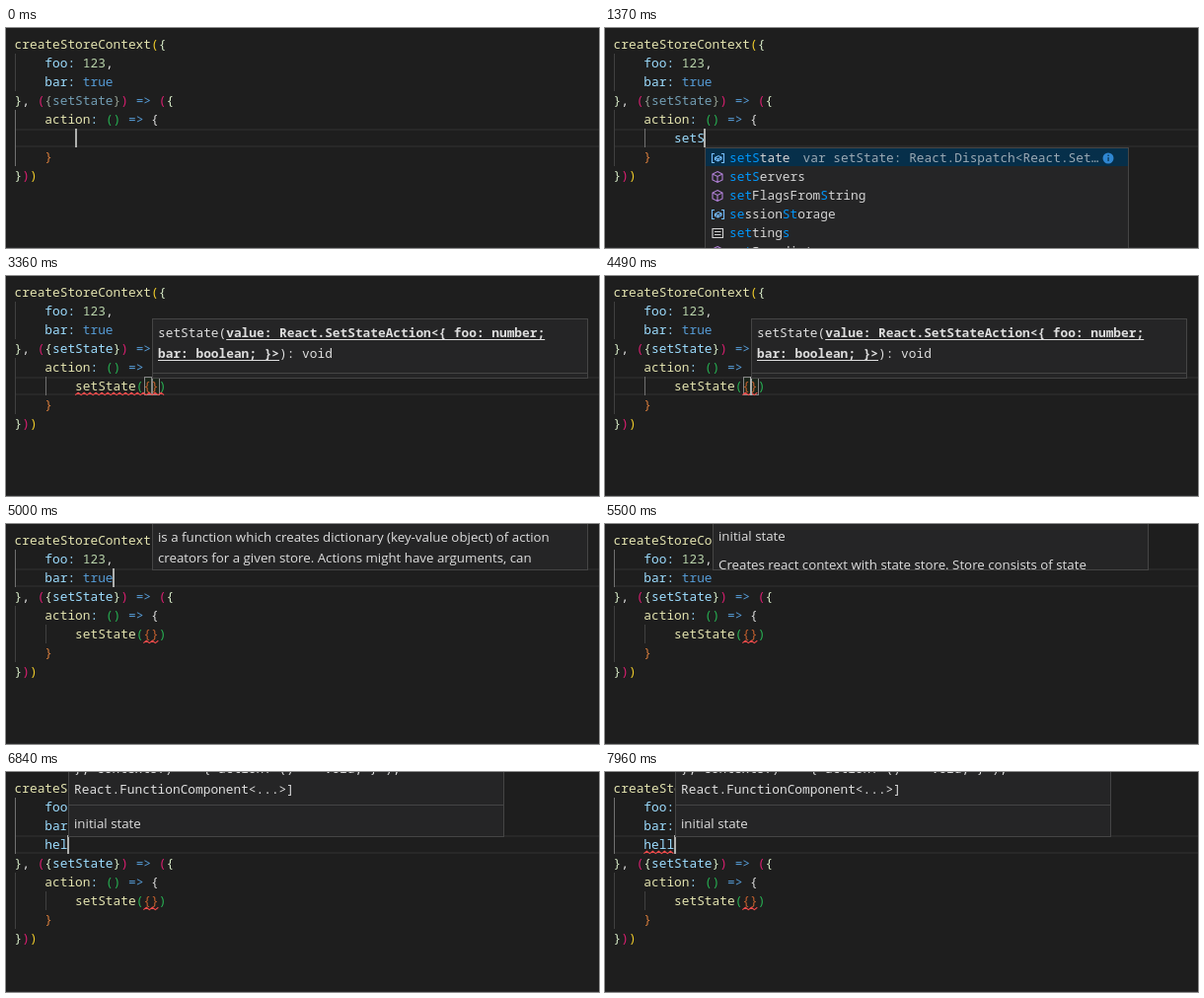
An HTML page with a canvas for the animation above (8000 ms loop, 601x223 px).

```html
<!DOCTYPE html>
<html lang="en">
<head>
<meta charset="utf-8">
<title>Editor typing</title>
<style>
  html, body { margin: 0; width: 100%; height: 100%; overflow: hidden; background: #1e1e1e; }
  canvas { display: block; }
</style>
</head>
<body>
<canvas id="stage" width="601" height="223"></canvas>
<script>
const ctx = document.getElementById('stage').getContext('2d');
const LOOP = 8000, CHAR = 7.69, LINE = 19;
const MONO = '12.82px "Noto Sans Mono", monospace';
const SANS = '13.3px "Open Sans", sans-serif';
const COLORS = {
  y: '#e4e4b0', b: '#9cdcfe', n: '#b9d4ab', k: '#569cd6', w: '#dcdcdc',
  g: '#f0cc2a', p: '#da1f70', e: '#27b052', m: '#d8ecc8', o: '#d67c3c', r: '#c4602e',
  f: '#729db3', d: '#949f92'
};
const colX = col => 8.6 + col * CHAR;
const rowY = row => 7 + row * LINE;

// Each step changes part of the editor state from its time on.
const steps = [
  [0, { body: '', extra: null, comma: '', row: 5, col: 8, on: 1, used: 0, list: null, tip: null,
        wave: null, extraWave: 0, match: [], guide: [0, 4, 6] }],
  [380, { on: 0 }],
  [530, { body: 's', col: 9, on: 1, guide: [4, 5, 5] }],
  [740, { body: 'se', col: 10 }],
  [890, { body: 'set', col: 11 }],
  [1210, { body: 'setS', col: 12 }],
  [1370, { list: 'all' }],
  [1420, { body: 'setSt', col: 13, list: 'few' }],
  [1500, { body: 'setSta', col: 14 }],
  [1580, { body: 'setStat', col: 15 }],
  [1670, { body: 'setState', col: 16 }],
  [2130, { body: 'setState()', col: 17, list: null, match: [[5, 16], [5, 17]] }],
  [2320, { used: 1 }],
  [2470, { tip: 'call', tipCol: 17, tipRow: 5 }],
  [2620, { on: 0 }],
  [2820, { wave: [8, 18] }],
  [2870, { body: 'setState({})', col: 18, on: 1, wave: [8, 20], match: [[5, 17], [5, 18]] }],
  [2950, { tipCol: 18 }],
  [3360, { on: 0 }],
  [3460, { wave: [17, 19], list: 'props', pick: 0 }],
  [3880, { on: 1 }],
  [4040, { pick: 1 }],
  [4330, { list: null, on: 0 }],
  [4490, { on: 1 }],
  [4610, { row: 4, match: [[4, 18], [6, 4]] }],
  [4720, { row: 3, match: [], tip: null, guide: [0, 4, 6] }],
  [4860, { row: 2, col: 13, guide: [0, 1, 2] }],
  [4940, { tip: 'args', tipRow: 2 }],
  [5160, { tip: 'init', tipCol: 13, shift: 0 }],
  [5500, { on: 0 }],
  [5800, { comma: ',', col: 14, on: 1 }],
  [5840, { tipCol: 14 }],
  [6000, { extra: '', row: 3, col: 4, guide: [0, 1, 3] }],
  [6070, { tipCol: 4, tipRow: 3 }],
  [6380, { extra: 'h', col: 5, tipCol: 5, shift: 21 }],
  [6510, { extra: 'he', col: 6, tipCol: 6 }],
  [6650, { extra: 'hel', col: 7 }],
  [6750, { tipCol: 7 }],
  [7120, { on: 0 }],
  [7250, { extraWave: 1 }],
  [7580, { on: 1 }],
  [7890, { extra: 'hell', col: 8 }],
  [7930, { tipCol: 8 }]
];

// Parts between * are highlighted as matching.
const lists = {
  all: [
    ['var', '*setS*tate', 'var setState: React.Dispatch<React.Set…'],
    ['cube', '*setS*ervers'],
    ['cube', '*set*FlagsFrom*S*tring'],
    ['var', '*se*ssion*St*orage'],
    ['word', '*set*ting*s*'],
    ['cube', '*set*Immediate']
  ],
  props: [
    ['field', 'bar', '(property) bar: boolean'],
    ['field', 'foo', '(property) foo: number']
  ]
};
lists.few = [['var', '*setSt*ate', lists.all[0][2]], ...[2, 3, 4].map(i => lists.all[i])];

const cubePath = 'M6 .5L11 3v6L6 11.5 1 9V3zM1 3l5 2.5L11 3M6 5.5v6';
const icons = {
  cube: ['#b180d7', cubePath],
  field: ['#75beff', cubePath],
  var: ['#75beff', 'M3 1.5H.5v9H3M10 1.5h2.5v9H10M3.5 5.5L7 3.5l3 1.5v2L6.5 9l-3-1.5zM3.5 5.5l3 1.5L10 5M6.5 7v2'],
  word: ['#d4d4d4', 'M1 1.5h10.5v9H1zM3 4.5h6.5M3 7.5h6.5']
};

function rect(x, y, w, h, color) {
  ctx.fillStyle = color;
  ctx.fillRect(x, y, w, h);
}

function text(str, x, y, color, font = MONO) {
  ctx.font = font;
  ctx.fillStyle = color;
  ctx.fillText(str, x, y);
}

// Tokens are separated by | and start with their colour key.
function tokens(source, row) {
  let col = 0;
  for (const token of source.split('|')) {
    text(token.slice(1), colX(col), rowY(row) + 14, COLORS[token[0]]);
    col += token.length - 1;
  }
}

function panel(x, y, w, h) {
  rect(x, y, w, h, '#454545');
  rect(x + 1, y + 1, w - 2, h - 2, '#252526');
}

function wave(row, from, to) {
  const bottom = rowY(row) + LINE, end = colX(to);
  ctx.beginPath();
  for (let x = colX(from), i = 0; x <= end; x += 3, i++) ctx.lineTo(x, bottom - (i % 2 ? 2.8 : 0.4));
  ctx.strokeStyle = '#f14c4c';
  ctx.lineWidth = 1.1;
  ctx.stroke();
}

function drawGuides(s, shift) {
  const guide = (col, from, to, color) =>
    rect(Math.ceil(colX(col)), rowY(from), 1, (to - from + 1) * LINE, color);
  guide(0, 1, 2 + shift, '#404040');
  guide(0, 4 + shift, 6 + shift, '#404040');
  if (s.body) guide(4, 5 + shift, 5 + shift, '#404040');
  guide(...s.guide, '#707070');
}

function drawCode(s) {
  const shift = s.extra === null ? 0 : 1;
  rect(9, rowY(s.row), 592, LINE, '#282828');
  rect(9, rowY(s.row) + 2, 592, LINE - 4, '#1e1e1e');
  drawGuides(s, shift);

  for (const [row, col] of s.match) {
    const x = Math.ceil(colX(col));
    rect(x, rowY(row), 8, LINE, 'rgba(0,100,0,.1)');
    ctx.strokeStyle = '#888';
    ctx.lineWidth = 1;
    ctx.strokeRect(x + .5, rowY(row) + .5, 7, LINE - 1);
  }

  const param = s.used ? 'm{|bsetState|m}' : 'd{|fsetState|d}';
  const call = s.body.includes('(')
    ? 'y        setState|e(|r' + s.body.slice(9, -1) + '|e)'
    : 'b        ' + s.body;
  const lines = [
    'ycreateStoreContext|g(|m{',
    'b    foo:|n 123|w,',
    'b    bar:|k true|w' + s.comma,
    `m}|w, |p(|${param}|p)|k => |p(|m{`,
    'y    action|b:|e ()|k => |w{',
    call,
    'o    }',
    'm}|p)|g)'
  ];
  if (shift) lines.splice(3, 0, 'b    ' + s.extra);
  lines.forEach(tokens);

  if (s.wave) wave(5 + shift, ...s.wave);
  if (s.extraWave) wave(3, 4, 4 + s.extra.length);
  if (s.on) rect(Math.floor(colX(s.col)), rowY(s.row), 2, LINE, '#aeafad');
}

function drawList(s) {
  const items = lists[s.list], pick = s.list === 'props' ? s.pick : 0;
  const x = Math.ceil(colX(s.col)), y = rowY(s.row + 1);
  panel(x, y, 430, items.length * LINE);
  items.forEach(([icon, label, detail], i) => {
    const top = y + 1 + i * LINE;
    if (i === pick) rect(x + 1, top, 428, LINE - 1, '#062f4a');

    ctx.save();
    ctx.translate(x + 7, top + 4);
    ctx.strokeStyle = icons[icon][0];
    ctx.lineWidth = 1.1;
    ctx.stroke(new Path2D(icons[icon][1]));
    ctx.restore();

    let left = x + 25;
    label.split('*').forEach((part, j) => {
      text(part, left, top + 14, j % 2 ? '#0097fb' : '#d4d4d4');
      left += part.length * CHAR;
    });
    if (i !== pick) return;
    text(detail, left + 13, top + 14, '#9aa9b4');
    ctx.beginPath();
    ctx.arc(x + 409, top + 10, 5.5, 0, 7);
    ctx.fillStyle = '#2f86d1';
    ctx.fill();
    rect(x + 408.5, top + 6.5, 1.2, 1.5, '#062f4a');
    rect(x + 408.5, top + 9, 1.2, 4, '#062f4a');
  });
}

function drawTip(s) {
  const x = Math.ceil(colX(s.tipCol)), bottom = rowY(s.tipRow) + 2;
  const height = s.tip === 'call' ? 61 : 250;
  const left = x + 6, color = '#dedede';
  panel(x, bottom - height, 442, height);
  ctx.save();
  ctx.beginPath();
  ctx.rect(x + 1, bottom - height + 1, 440, height - 2);
  ctx.clip();

  if (s.tip === 'call') {
    const bold = (str, bx, by) => {
      text(str, bx, by, color, 'bold ' + MONO);
      rect(bx, by + 2, str.length * CHAR, 1, color);
    };
    text('setState(', left, bottom - 42, color);
    bold('value: React.SetStateAction<{ foo: number;', left + 9 * CHAR, bottom - 42);
    bold('bar: boolean; }>', left, bottom - 21);
    text('): void', left + 16 * CHAR, bottom - 21, color);
    rect(x + 1, bottom - 6, 440, 1, '#454545');
  } else if (s.tip === 'args') {
    text('is a function which creates dictionary (key-value object) of action', left, bottom - 29, color, SANS);
    text('creators for a given store. Actions might have arguments, can', left, bottom - 8, color, SANS);
  } else {
    const y = bottom - 68 + s.shift;
    text('}, contexts?) => { action: () => void; }>),', left, y - 18, color);
    text('React.FunctionComponent<...>]', left, y + 3, color);
    rect(x + 1, y + 14, 440, 1, '#454545');
    text('initial state', left, y + 38, color, SANS);
    text('Creates react context with state store. Store consists of state', left, y + 67, color, SANS);
  }
  ctx.restore();
}

function frame() {
  const time = performance.now() % LOOP;
  const state = Object.assign({}, ...steps.filter(([at]) => at <= time).map(([, change]) => change));
  rect(0, 0, 601, 223, '#1e1e1e');
  rect(0, 222, 601, 1, '#2a2b2c');
  drawCode(state);
  if (state.tip) drawTip(state);
  if (state.list) drawList(state);
  requestAnimationFrame(frame);
}
frame();
</script>
</body>
</html>
```
